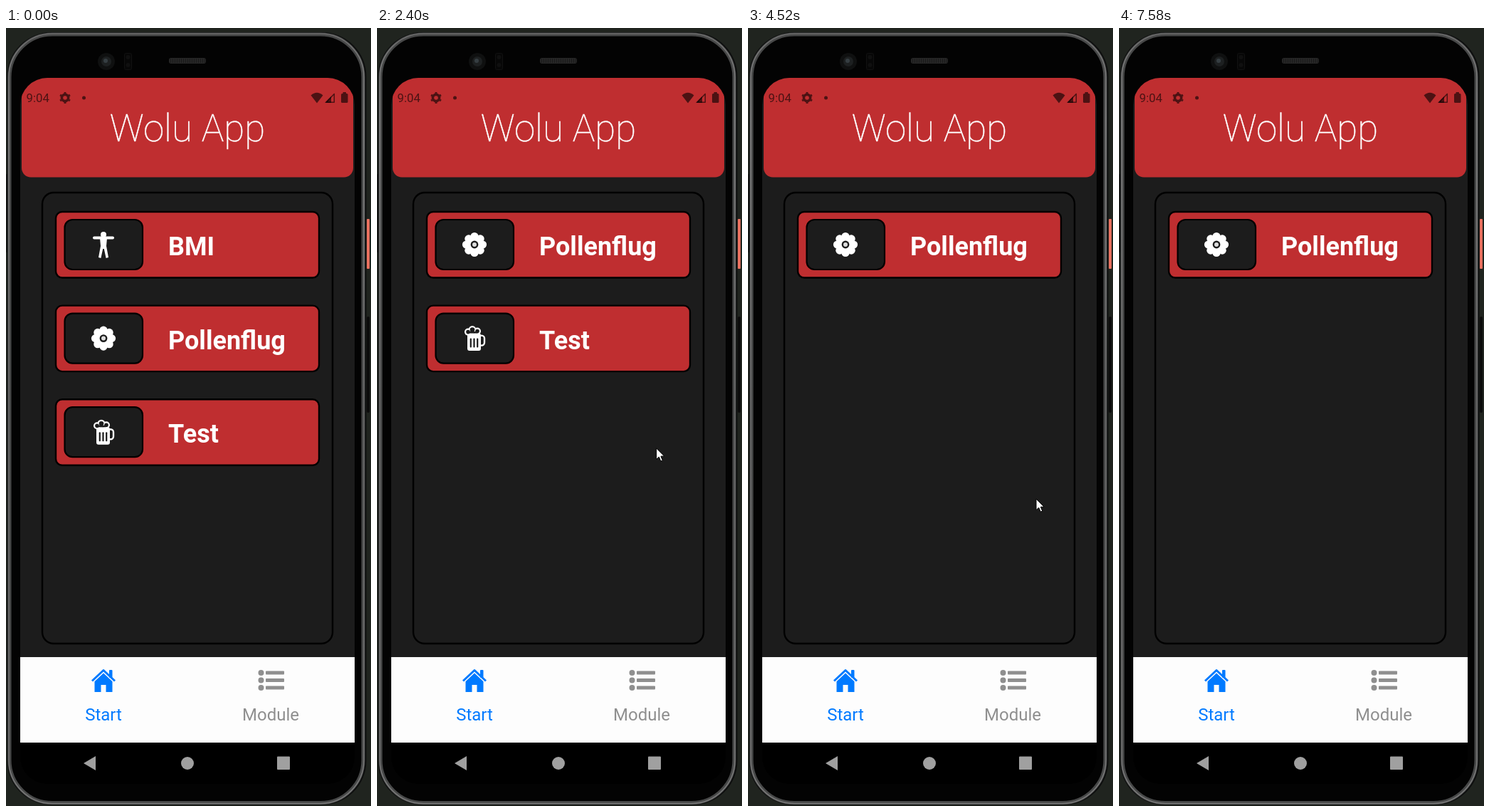
These frames come from a looping animation (513x1092 px, 7980 ms). An HTML page with a canvas:

```html
<!DOCTYPE html>
<html lang="de">
<head>
<meta charset="utf-8">
<title>Modul-App</title>
<style>
html, body { margin: 0; width: 100%; height: 100%; overflow: hidden; background: #20241f; }
canvas { display: block; width: 513px; height: 1092px; }
</style>
</head>
<body>
<canvas id="stage" width="513" height="1092"></canvas>
<script>
const ctx = document.getElementById('stage').getContext('2d');
const LOOP = 7980, STEP = 70;
const RED = '#bf2e30', DARK = '#1c1c1c', BLUE = '#007aff', GREY = '#8f8f8f';

// Pointer moves: start, end, from x, y, to x, y
const MOVES = [
  [130, 550, 456, 1055, 310, 309],
  [1630, 2260, 310, 309, 407, 608],
  [2400, 2680, 407, 608, 264, 429],
  [3820, 4310, 264, 429, 407, 608],
  [4450, 4940, 407, 608, 391, 944],
  [6210, 6490, 391, 944, 135, 972],
  [6630, 6900, 135, 972, 111, 965],
  [7030, 7510, 111, 965, 396, 1088]
];
const CLICKS = [[620, 1630], [2330, 2400], [2750, 3820], [4380, 4450], [5010, 5080], [6560, 6630]];
const DIALOGS = [[1490, 2400, 'BMI'], [3550, 4450, 'Test']];

const within = (t, a, b) => t >= a && t < b;

function box(x0, y0, x1, y1, r, fill, stroke, width = 2) {
  ctx.beginPath();
  ctx.roundRect(x0, y0, x1 - x0, y1 - y0, r);
  if (fill) { ctx.fillStyle = fill; ctx.fill(); }
  if (stroke) { ctx.strokeStyle = stroke; ctx.lineWidth = width; ctx.stroke(); }
}

function disc(x, y, r, fill) {
  ctx.beginPath();
  ctx.arc(x, y, r, 0, 7);
  ctx.fillStyle = fill;
  ctx.fill();
}

function poly(points, fill) {
  ctx.beginPath();
  for (let i = 0; i < points.length; i += 2) ctx.lineTo(points[i], points[i + 1]);
  ctx.closePath();
  ctx.fillStyle = fill;
  ctx.fill();
}

function text(str, x, y, size, color, weight = 400, align = 'left') {
  ctx.font = `${weight} ${size}px Roboto, sans-serif`;
  ctx.textAlign = align;
  ctx.fillStyle = color;
  ctx.fillText(str, x, y);
}

function header(title, bottom) {
  box(22, 60, 488, bottom, [0, 0, 13, 13], RED);
  text(title, 255, 159, 53, '#fff', 100, 'center');
  ctx.strokeStyle = '#fff';
  ctx.lineWidth = 0.5;
  ctx.strokeText(title, 255, 159);
}

function phone() {
  ctx.fillStyle = '#20241f';
  ctx.fillRect(0, 0, 513, 1092);
  box(507, 268, 511, 338, 1, '#e8705f');
  box(507, 405, 511, 540, 2, '#0c0c0c');
  box(0, 205, 3, 315, 1, '#141514');
  box(1.5, 6, 506.5, 1090.5, 62, '#0d0e0e');
  const rim = ctx.createLinearGradient(0, 0, 0, 1092);
  rim.addColorStop(0, '#6a6a6a');
  rim.addColorStop(0.12, '#868686');
  rim.addColorStop(0.5, '#6a6a6a');
  rim.addColorStop(1, '#777');
  box(5, 9, 502, 1087.5, 60, '#030303', '#474848', 5);
  box(4, 8, 503, 1088.5, 61, null, rim, 1.6);
  disc(141, 47, 12, '#0f1010');
  disc(141, 47, 7, '#1d2021');
  disc(140, 46, 3, '#363e42');
  box(166.5, 35.5, 176.5, 58.5, 2, '#070707', '#111', 1);
  disc(171.5, 41, 3, '#101010');
  disc(171.5, 52, 3, '#101010');
  box(229, 42, 281, 50, 3, '#262626');
  ctx.fillStyle = '#1a1a1a';
  for (let x = 231; x < 280; x += 3) ctx.fillRect(x, 43, 1, 6);
}

const icons = {
  BMI(x, y) {
    disc(x, y - 14, 4, '#fff');
    box(x - 15, y - 11.5, x + 15, y - 7.5, 2, '#fff');
    poly([x - 5, y - 9, x + 5, y - 9, x + 4, y + 2, x + 7, y + 18, x + 3.6, y + 19,
      x + 0.8, y + 6, x - 0.8, y + 6, x - 3.6, y + 19, x - 7, y + 18, x - 4, y + 2], '#fff');
  },
  Pollenflug(x, y, ink) {
    for (let i = 0; i < 8; i++) {
      const a = i * Math.PI / 4;
      disc(x + 11.5 * Math.cos(a), y + 11.5 * Math.sin(a), 5.6, '#fff');
    }
    disc(x, y, 11, '#fff');
    disc(x, y, 5.4, ink);
    disc(x, y, 3, '#ddd');
  },
  Test(x, y, ink) {
    box(x + 6, y - 4, x + 14, y + 10, 4, null, '#fff', 2.4);
    box(x - 10, y - 7, x + 9, y + 17.5, 3, '#fff');
    for (const dx of [-6.3, -1.6, 3.1]) box(x + dx, y, x + dx + 2.2, y + 13, 1, ink);
    const foam = [[-9, -9, 5], [-3, -12, 5.5], [4, -10, 5]];
    for (const [dx, dy, r] of foam) disc(x + dx, y + dy, r, '#fff');
    for (const [dx, dy, r] of foam) disc(x + dx, y + dy, r - 2.2, ink);
    box(x - 9, y - 9.5, x + 4, y - 7, 1, ink);
  }
};

function card(y, name, pressed, bg) {
  if (pressed) box(69, y, 441, y + 94, 10, '#d55253', '#777', 2);
  else box(70, y + 1, 440, y + 93.5, 9, RED, '#000', 2.4);
  box(82.5, y + 12, 192, y + 82, 11, bg, '#000', 2.2);
  icons[name](137, y + 47, bg);
  text(name, 228, y + 62, 36, '#fff', 700);
}

function home(x, y, color) {
  ctx.strokeStyle = color;
  ctx.lineWidth = 3;
  ctx.lineJoin = 'round';
  ctx.beginPath();
  ctx.moveTo(x - 16, y + 0.5);
  ctx.lineTo(x, y - 14.5);
  ctx.lineTo(x + 16, y + 0.5);
  ctx.stroke();
  box(x + 8, y - 15, x + 12.5, y - 4, 1, color);
  poly([x, y - 10.5, x + 12.5, y + 1.2, x + 12.5, y + 16, x + 3.5, y + 16, x + 3.5, y + 6,
    x - 3.5, y + 6, x - 3.5, y + 16, x - 12.5, y + 16, x - 12.5, y + 1.2], color);
}

function tabs(onModules) {
  const left = onModules ? GREY : BLUE, right = onModules ? BLUE : GREY;
  ctx.fillStyle = '#fdfdfd';
  ctx.fillRect(20, 883, 470, 120);
  home(137, 916, left);
  text('Start', 137, 972, 24, left, 400, 'center');
  for (const y of [905, 915.5, 926]) {
    disc(358.5, y, 4, right);
    box(365, y - 2.6, 391, y + 2.6, 1, right);
  }
  text('Module', 372, 972, 24, right, 400, 'center');
}

function status(color) {
  text('9:04', 28.5, 104, 16.8, color);
  ctx.strokeStyle = color;
  ctx.lineWidth = 3.6;
  ctx.beginPath();
  ctx.arc(83, 98, 4.6, 0, 7);
  ctx.stroke();
  ctx.lineWidth = 3;
  for (let i = 0; i < 6; i++) {
    const c = Math.cos(i * Math.PI / 3 + 0.52), s = Math.sin(i * Math.PI / 3 + 0.52);
    ctx.beginPath();
    ctx.moveTo(83 + 6.2 * c, 98 + 6.2 * s);
    ctx.lineTo(83 + 8 * c, 98 + 8 * s);
    ctx.stroke();
  }
  disc(109.5, 98, 2.5, color);
  ctx.beginPath();
  ctx.moveTo(437, 105.5);
  ctx.lineTo(428.5, 94.5);
  ctx.quadraticCurveTo(437, 87, 445.5, 94.5);
  ctx.closePath();
  ctx.fill();
  poly([448, 105, 457, 96, 457, 105], color);
  ctx.lineWidth = 1.5;
  ctx.beginPath();
  ctx.moveTo(450, 104.2);
  ctx.lineTo(461.3, 104.2);
  ctx.lineTo(461.3, 92.5);
  ctx.closePath();
  ctx.stroke();
  box(471, 92, 480.5, 105, 1.5, color);
  box(473.5, 90, 478, 92, 0.5, color);
}

function startPage(cards, pressed, bg) {
  header('Wolu App', 209.5);
  box(51, 231, 459, 864, 16, null, '#000', 2.4);
  cards.forEach((name, i) => card(257 + i * 131.6, name, name === pressed, bg));
}

function modulePage() {
  header('Module', 210.5);
  box(61, 232, 449, 769, 16, null, '#000', 2.4);
  card(257.6, 'BMI', false, DARK);
  card(389.4, 'Test', false, DARK);
  box(48, 800, 462, 869, 10, '#191919');
  box(49.5, 790, 460, 859, 10, RED, '#000', 2.6);
  text('Hinzufügen', 254.5, 835, 42.2, '#000', 400, 'center');
}

function dialog(name, alpha) {
  ctx.globalAlpha = alpha;
  box(50.5, 510, 459, 635, 2.5, '#fff');
  ctx.globalAlpha = 1;
  text(`Soll das Modul ${name} gelöscht werden?`, 79.3, 552.5, 19.2, '#2a2a2a');
  text('ABBRECHEN', 255, 608, 17, '#1d6cb0', 500);
  text('OK', 394, 608, 17, '#1d6cb0', 500);
}

function navButtons() {
  const c = '#a0a0a0';
  poly([109, 1032, 126, 1022, 126, 1042], c);
  disc(255, 1032, 9, c);
  box(381, 1022.5, 399, 1041, 1, c);
}

function pointer(t) {
  if (t < 130 || t >= 7580) return;
  const [t0, t1, x0, y0, x1, y1] = MOVES.filter(m => t >= m[0]).pop();
  const steps = Math.round((t1 - t0) / STEP) + 1;
  const p = Math.min(1, (Math.floor((t - t0) / STEP) + 1) / steps);
  const e = p * p * (3 - 2 * p);
  const x = x0 + (x1 - x0) * e, y = y0 + (y1 - y0) * e;
  if (CLICKS.some(c => within(t, ...c))) disc(x, y, 11.5, 'rgba(238,205,5,.66)');
  ctx.save();
  ctx.translate(x + 0.5, y + 0.5);
  poly([0, 0, 0, 15.5, 3.7, 12.2, 6.2, 18, 8.8, 17, 6.3, 11.3, 11, 11], '#fff');
  ctx.strokeStyle = '#000';
  ctx.lineWidth = 1;
  ctx.stroke();
  ctx.restore();
}

function draw(t) {
  const alert = DIALOGS.find(d => within(t, d[0], d[1]));
  let dim = 0, alpha = 0;
  if (alert) {
    if (t < alert[0] + STEP) [dim, alpha] = [0.265, 0.83];
    else if (t >= alert[1] - STEP) [dim, alpha] = [0.3, 0.5];
    else [dim, alpha] = [0.6, 1];
  }
  const bg = dim > 0.5 ? '#000' : DARK;
  const cards = t < 2400 ? ['BMI', 'Pollenflug', 'Test'] : t < 4450 ? ['Pollenflug', 'Test'] : ['Pollenflug'];
  const pressed = within(t, 620, 2400) ? 'BMI' : within(t, 2750, 4450) ? 'Test' : '';
  const onModules = within(t, 5080, 6630);

  phone();
  ctx.save();
  ctx.beginPath();
  ctx.roundRect(20, 70, 470, 991, 38);
  ctx.clip();
  ctx.fillStyle = '#000';
  ctx.fillRect(20, 70, 470, 992);
  ctx.fillStyle = bg;
  ctx.fillRect(20, 70, 470, 813);
  if (onModules) modulePage();
  else startPage(cards, pressed, bg);
  tabs(onModules);
  if (dim) {
    ctx.fillStyle = `rgba(0,0,0,${dim})`;
    ctx.fillRect(20, 70, 470, 933);
    dialog(alert[2], alpha);
  }
  status(dim ? '#fff' : 'rgba(0,0,0,.6)');
  navButtons();
  ctx.restore();
  pointer(t);
}

const begin = performance.now();
function tick() {
  draw((performance.now() - begin) % LOOP);
  requestAnimationFrame(tick);
}
tick();
</script>
</body>
</html>
```
